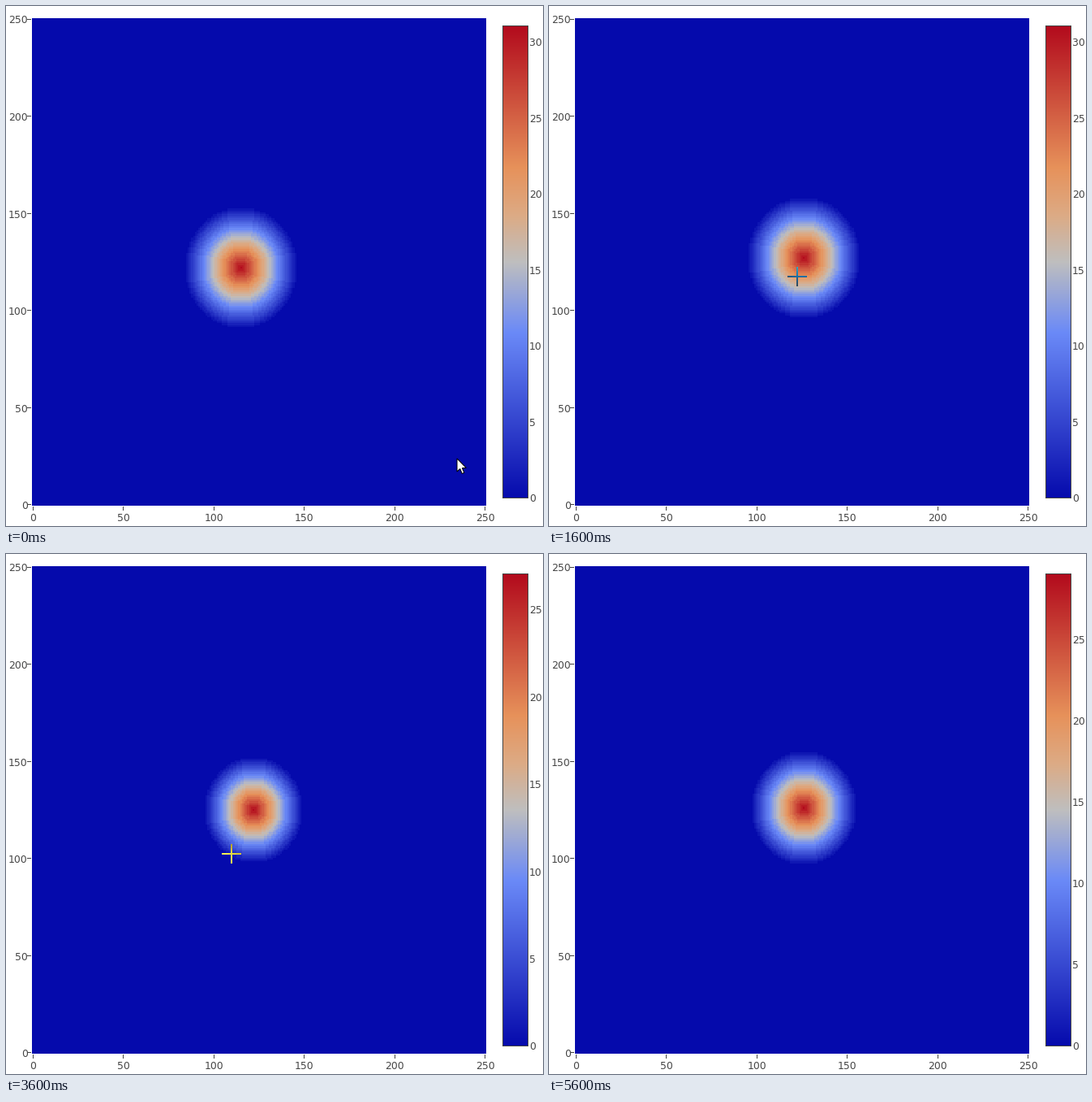
Write a matplotlib script that moves like this. It is 662 px wide and 640 px high and loops after 6800 ms.

```python
import numpy as np
import matplotlib.pyplot as plt
from matplotlib.animation import FuncAnimation
from matplotlib.patches import Polygon

W, H, DPI = 662, 640, 100
FRAMES, STEP = 68, 100
N = 251                                        # cells per side
LEFT, TOP, PW, PH = 32, 15, 560, 600           # plot area
BAR_L, BAR_R, BAR_T, BAR_B = 613, 643, 25, 605
GREY = 68

STOPS = [0, .35, .5, .6, .7, 1]
COLORS = np.array([(5, 10, 172), (106, 137, 247), (190, 190, 190),
                   (220, 170, 132), (230, 145, 90), (178, 10, 28)])

# first tick, cone centre x, y, peak
CONES = [(0, 115, 122, 31), (16, 126, 127, 31),
         (36, 122, 125, 27), (56, 126, 126, 29)]

# first tick, cursor kind, x, y
MOVES = [(7, 'cross', 308, 326), (8, 'cross', 307, 330), (9, 'cross', 306, 333),
         (19, 'cross', 307, 326),
         (29, 'cross', 318, 352), (30, 'cross', 312, 386), (31, 'cross', 278, 369),
         (38, 'cross', 250, 410), (39, 'cross', 212, 470), (40, 'cross', 172, 535),
         (41, 'cross', 132, 588), (42, 'arrow', 74, 629), (43, None, 0, 0)]

# first tick, end tick, hovered cell
HOVERS = [(6, 7, 126, 125), (21, 26, 123, 120), (41, 45, 44, 11)]


def latest(table, tick):
    return [row for row in table if row[0] <= tick][-1]


def colour(t):
    return np.stack([np.interp(t, STOPS, COLORS[:, c]) for c in range(3)], -1)


def px(cx):
    return LEFT + (cx + .5) * PW / N


def py(cy):
    return TOP + PH - (cy + .5) * PH / N


def height(x, y, cone):
    _, cx, cy, peak = cone
    return np.maximum(0, peak - np.floor(np.hypot(x - cx, y - cy)))


def draw_plot(cone):
    img = np.full((H, W, 3), 255.0)
    cols = ((np.arange(PW) + .5) * N / PW).astype(int)
    rows = N - 1 - ((np.arange(PH) + .5) * N / PH).astype(int)
    z = height(cols[None, :], rows[:, None], cone)
    img[TOP:TOP + PH, LEFT:LEFT + PW] = colour(z / cone[3])
    for v in range(0, 251, 50):
        img[TOP + PH + 1:TOP + PH + 6, int(px(v))] = GREY
        img[int(py(v)), LEFT - 6:LEFT - 1] = GREY
    img[BAR_T - 1:BAR_B + 1, BAR_L - 1:BAR_R + 1] = GREY
    t = (BAR_B - np.arange(BAR_T, BAR_B) - .5) / (BAR_B - BAR_T)
    img[BAR_T:BAR_B, BAR_L:BAR_R] = colour(t)[:, None]
    return img


def draw_label(img, cx, cy):
    """Paint the hover box and return its left edge and middle row."""
    tip, left = int(px(cx)), round(px(cx) + 6)
    mid = int(py(cy))
    right = round(px(cx) + 51 - 6.5 * (3 - len(str(cx))))
    img[mid - 28:mid + 28, left:right] = 255
    img[mid - 27:mid + 27, left + 1:right - 1] = GREY
    for d in range(left - tip + 1):
        img[mid - d:mid + d + 1, tip + d] = 255
        if d:
            img[mid - d + 1:mid + d, tip + d] = GREY
    return left, mid


def draw_cross(img, x, y):
    mask = np.zeros((H, W), bool)
    mask[y - 12:y + 12, x - 1:x + 1] = True
    mask[y - 1:y + 1, x - 12:x + 12] = True
    img[mask] = 255 - img[mask]


def cursor(tick):
    if tick == 0:
        return 'arrow', 556, 557
    if tick <= 6:
        left = (1 - tick / 6) ** 2
        return 'cross', round(314 + 242 * left), round(316 + 241 * left)
    return latest(MOVES, tick)[1:]


plt.rcParams['toolbar'] = 'None'
fig = plt.figure(figsize=(W / DPI, H / DPI), dpi=DPI, facecolor='white')
ax = fig.add_axes([0, 0, 1, 1])
ax.axis('off')

plots = {cone[0]: draw_plot(cone) for cone in CONES}
picture = ax.imshow(plots[0].astype(np.uint8), extent=(0, W, H, 0),
                    aspect='auto', interpolation='nearest')
ax.set_xlim(0, W)
ax.set_ylim(H, 0)


def text(x, y, s='', size=12.4, font='DejaVu Sans', color='#444444', ha='left'):
    return ax.text(x, y, s, fontsize=size * 72 / DPI, family=font, color=color,
                   ha=ha, va='baseline')


for v in range(0, 251, 50):
    text(px(v), 633.5, str(v), ha='center')
    text(26.5, py(v) + 5.3, str(v), ha='right')

bar_labels = [text(645, 0, str(v)) for v in range(0, 31, 5)]
hover_lines = [text(0, 0, size=13, font='Liberation Sans', color='white')
               for _ in range(3)]
ARROW = np.array([(0, 0), (0, 16), (3.8, 12.6), (6.2, 18.5), (8.8, 17.4),
                  (6.4, 11.7), (11.3, 11.5)])
arrow = ax.add_patch(Polygon(ARROW, facecolor='white', edgecolor='black',
                             linewidth=.72, zorder=5))


def update(tick):
    cone = latest(CONES, tick)
    img = plots[cone[0]].copy()

    for i, label in enumerate(bar_labels):
        v = 5 * i
        label.set_visible(v <= cone[3])
        label.set_y(BAR_B - (BAR_B - BAR_T) * v / cone[3] + 5.5)

    hover = [h for h in HOVERS if h[0] <= tick < h[1]]
    for line in hover_lines:
        line.set_visible(bool(hover))
    if hover:
        cx, cy = hover[0][2:]
        left, mid = draw_label(img, cx, cy)
        values = cx, cy, int(height(cx, cy, cone))
        for line, name, v, dy in zip(hover_lines, 'xyz', values, (-12, 5, 21)):
            line.set_text(f'{name}: {v}')
            line.set_position((left + 3.5, mid + dy))

    kind, x, y = cursor(tick)
    arrow.set_visible(kind == 'arrow')
    if kind == 'arrow':
        arrow.set_xy(ARROW + (x, y))
    elif kind == 'cross':
        draw_cross(img, x, y)

    picture.set_data(np.rint(img).astype(np.uint8))
    return [picture, arrow, *bar_labels, *hover_lines]


anim = FuncAnimation(fig, update, frames=FRAMES, interval=STEP,
                     repeat=True, repeat_delay=0, blit=False)
plt.show()
```
